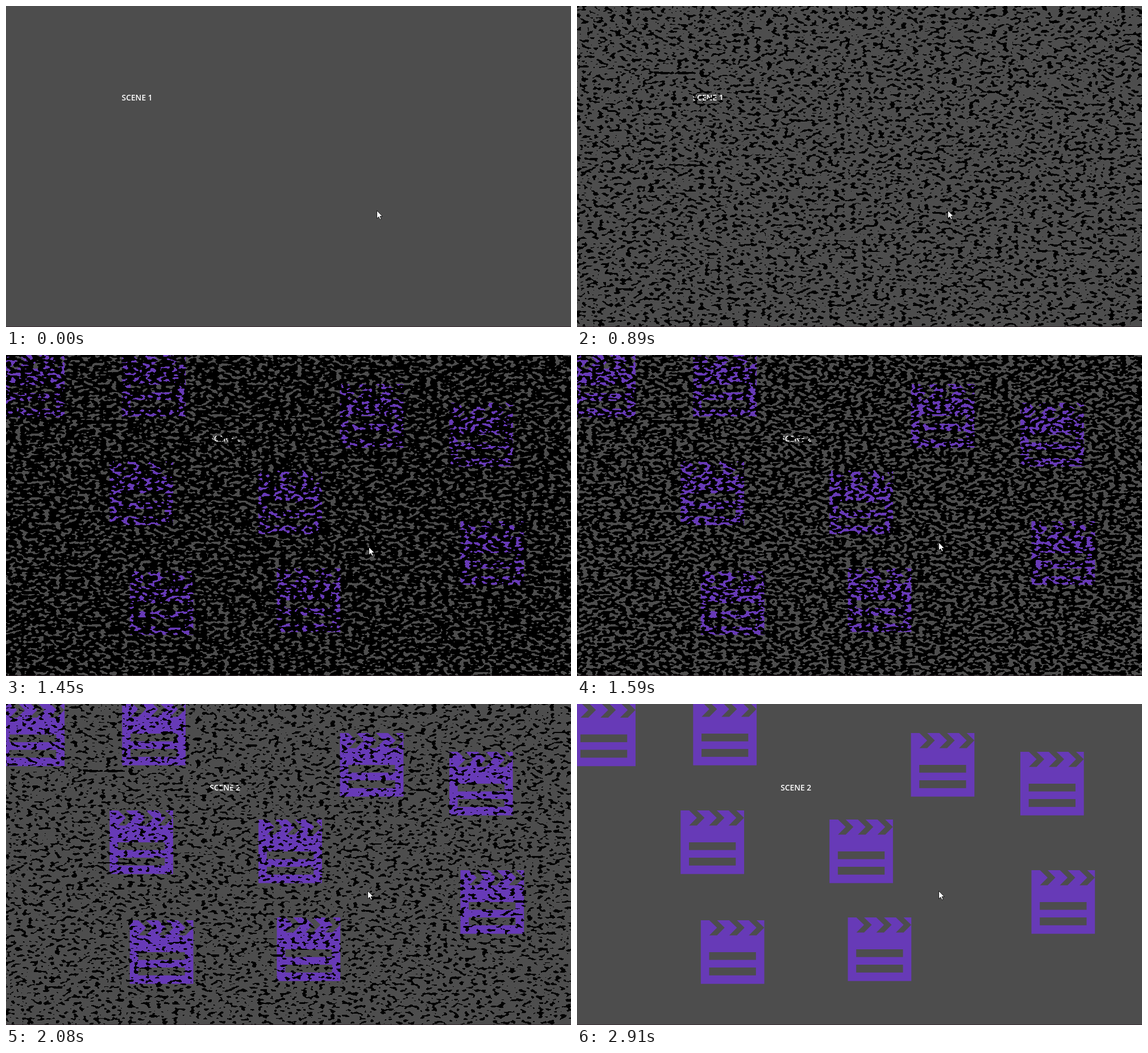
These frames come from a looping animation (994 by 564 pixels, 3.26 s). An HTML page with a canvas:

```html
<!DOCTYPE html>
<html lang="en">
<head>
<meta charset="utf-8">
<title>Scene transition</title>
<style>
  html, body { margin: 0; width: 994px; height: 564px; overflow: hidden; background: #4d4d4d; }
  svg, canvas { position: absolute; left: 0; top: 0; display: block; }
  text { font: 600 13.8px "Open Sans", "Noto Sans", sans-serif; fill: #fff; }
</style>
</head>
<body>
<svg width="994" height="564">
  <defs>
    <path id="chevron" d="M15 0H28.5L42 13 28.5 26.5H15L28.5 13Z"/>
    <g id="clapper">
      <rect width="111.7" height="111.7" fill="#673ab7"/>
      <g fill="#4d4d4d">
        <use href="#chevron"/>
        <use href="#chevron" x="35"/>
        <use href="#chevron" x="69.5"/>
        <rect x="14.7" y="56" width="82.3" height="13.6"/>
        <rect x="14.7" y="83" width="82.3" height="13.8"/>
      </g>
    </g>
  </defs>
  <rect width="994" height="564" fill="#4d4d4d"/>
  <g id="scene1"><text x="203.6" y="166">SCENE 1</text></g>
  <g id="scene2"><text x="358.2" y="152">SCENE 2</text></g>
</svg>
<canvas id="noise" width="994" height="563"></canvas>
<svg width="994" height="564">
  <rect y="563" width="994" height="1" fill="#3a2c33"/>
  <path id="cursor" d="M.5 .5V14.3L3.7 11.4 6 16.3 8.2 15.3 6 10.5H10.2Z" fill="#fff" stroke="#111" stroke-width=".9"/>
</svg>
<script>
const W = 994, H = 563, LOOP = 3260, SWAP = 1450;
const byId = id => document.getElementById(id);
const scene1 = byId('scene1'), scene2 = byId('scene2'), cursor = byId('cursor');
const ctx = byId('noise').getContext('2d');

const clappers = [[-8.7, -2.5], [204.3, -4], [587.5, 51], [780, 84], [182.3, 187],
  [444.2, 203], [799.5, 292], [217.8, 380], [476.5, 375]];
for (const [x, y] of clappers) {
  const use = document.createElementNS('http://www.w3.org/2000/svg', 'use');
  use.setAttribute('href', '#clapper');
  use.setAttribute('x', x);
  use.setAttribute('y', y);
  scene2.prepend(use);
}

// Start times of the steps: [first, count, interval]
const steps = [0];
for (const [first, count, gap] of [[320, 8, 70], [890, 8, 70], [1450, 8, 70], [2010, 4, 70], [2280, 4, 70], [2560, 6, 70]])
  for (let i = 0; i < count; i++) steps.push(first + i * gap);

// Gradient noise
function hash(x, y) {
  let h = Math.imul(x, 374761393) + Math.imul(y, 668265263) + 1274126177 | 0;
  h = Math.imul(h ^ h >>> 13, 1274126177);
  h = Math.imul(h ^ h >>> 15, 2246822519);
  return (h ^ h >>> 16) >>> 0;
}
const fade = t => t * t * t * (t * (t * 6 - 15) + 10);
const mix = (a, b, t) => a + (b - a) * t;
const cosT = [], sinT = [];
for (let i = 0; i < 64; i++) {
  cosT.push(Math.cos(i * Math.PI / 32));
  sinT.push(Math.sin(i * Math.PI / 32));
}
function slope(ix, iy, dx, dy) {
  const a = hash(ix, iy) & 63;
  return cosT[a] * dx + sinT[a] * dy;
}
function perlin(x, y) {
  const ix = Math.floor(x), iy = Math.floor(y), dx = x - ix, dy = y - iy, u = fade(dx);
  return mix(
    mix(slope(ix, iy, dx, dy), slope(ix + 1, iy, dx - 1, dy), u),
    mix(slope(ix, iy + 1, dx, dy - 1), slope(ix + 1, iy + 1, dx - 1, dy - 1), u),
    fade(dy));
}

// Square noise texture, stretched over the stage and scaled to unit deviation
const N = 512, texture = new Float32Array(N * N), field = new Float32Array(W * H);
for (let y = 0, i = 0; y < N; y++)
  for (let x = 0; x < N; x++, i++)
    texture[i] = perlin(x * .197 + .31, y * .197 + .57) + .45 * perlin(x * .371 + 140.2, y * .371 + 90.7);
let sum = 0;
for (let y = 0, i = 0; y < H; y++) {
  const v = y * (N - 1.01) / H, iy = Math.floor(v), fy = v - iy;
  for (let x = 0; x < W; x++, i++) {
    const u = x * (N - 1.01) / W, ix = Math.floor(u), fx = u - ix, k = iy * N + ix;
    const n = mix(mix(texture[k], texture[k + 1], fx), mix(texture[k + N], texture[k + N + 1], fx), fy);
    field[i] = n;
    sum += n * n;
  }
}
const deviation = Math.sqrt(sum / field.length);

const image = ctx.createImageData(W, H);
const pixels = new Uint32Array(image.data.buffer);
function cutoff(t) {
  if (t < 320 || t >= 2910) return -9;
  return t < SWAP ? -2.7 + (t - 320) * .00335 : .62 - (t - SWAP) * .00236;
}
function drawNoise(level) {
  const limit = level * deviation;
  for (let i = 0; i < field.length; i++) pixels[i] = field[i] < limit ? 0xff000000 : 0;
  ctx.putImageData(image, 0, 0);
}

const track = [[0, 652, 359], [960, 652, 359], [1170, 642, 359], [1450, 638, 337], [1600, 636, 328], [LOOP, 636, 328]];
function cursorAt(t) {
  const i = track.findIndex(p => p[0] > t), [t0, x0, y0] = track[i - 1], [t1, x1, y1] = track[i];
  const k = (t - t0) / (t1 - t0);
  return [Math.round(mix(x0, x1, k)), Math.round(mix(y0, y1, k))];
}

let shown = -1;
function render() {
  const now = performance.now() % LOOP;
  let t = 0;
  for (const s of steps) if (s <= now) t = s;
  if (t !== shown) {
    shown = t;
    scene1.style.display = t < SWAP ? '' : 'none';
    scene2.style.display = t < SWAP ? 'none' : '';
    cursor.setAttribute('transform', `translate(${cursorAt(t)})`);
    drawNoise(cutoff(t));
  }
  requestAnimationFrame(render);
}
render();
</script>
</body>
</html>
```
